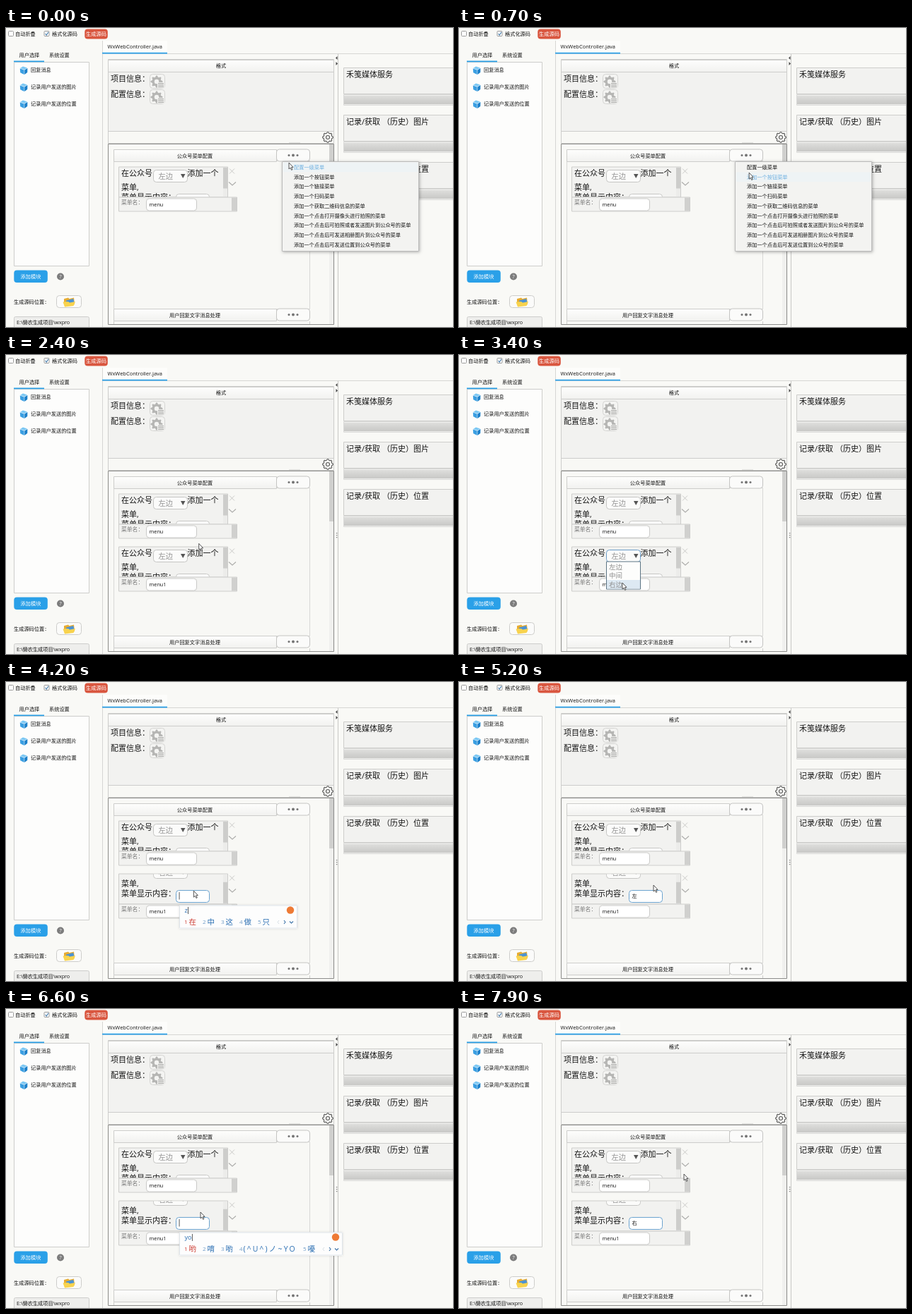
An HTML page with a canvas that plays this animation: 632x424 px, repeating every 8000 ms.

```html
<!DOCTYPE html>
<html lang="zh">
<head>
<meta charset="utf-8">
<style>
html, body { margin: 0; width: 100%; height: 100%; overflow: hidden; background: #f9f9f6; }
canvas { display: block; width: 632px; height: 424px; }
</style>
</head>
<body>
<canvas id="stage"></canvas>
<script>
const W = 632, H = 424, LOOP = 8000, STEP = 100;
const canvas = document.getElementById('stage');
const dpr = window.devicePixelRatio || 1;
canvas.width = W * dpr;
canvas.height = H * dpr;
const c = canvas.getContext('2d');
const FONT = '"Open Sans", "Noto Sans CJK SC", "Noto Sans CJK", sans-serif';
const BLUE = '#2aa0e8', INK = '#151515', LINE = '#cdcdcb', PANEL = '#f2f2f0', PAGE = '#f9f9f6';

// Event times in ms
const ADDED = 1100, DROP_OPEN = 2800, PICKED = 3700, SCROLL = 3800, FOCUS = 4100;

// Pointer keys: time, x, y
const POINTER = [
  [0, 400, 191], [200, 400, 191], [600, 410, 205], [1000, 411, 206], [1400, 413, 200],
  [1900, 413, 200], [2600, 238, 284], [2900, 238, 284], [3300, 231, 323], [3700, 231, 323],
  [3900, 262, 297], [4100, 262, 299], [4400, 275, 288], [7700, 275, 288], [7900, 318, 234]
];

// Input method states: from, to, typed letters, candidates
const IME = [
  [4200, 4300, 'z', '在 中 这 做 只'],
  [4300, 4400, 'zu', '组 足 族 租 祖'],
  [4400, 4700, 'zuo', '做 坐 作 左 座'],
  [6500, 6600, 'y', '一 有 也 要 与'],
  [6600, 6700, 'yo', '哟 唷 喲 (^U^)ノ~YO 嚘'],
  [6700, 7100, 'you', '有 又 右 由 友']
];

// Field edits: time, value; each one restarts the caret blink
const EDITS = [[FOCUS, ''], [4700, '左'], [5400, ''], [7100, '右']];

const MENU = ['配置一级菜单', '添加一个按钮菜单', '添加一个链接菜单', '添加一个扫码菜单',
  '添加一个获取二维码信息的菜单', '添加一个点击打开摄像头进行拍照的菜单',
  '添加一个点击后可拍照或者发送图片到公众号的菜单',
  '添加一个点击后可发送相册图片到公众号的菜单', '添加一个点击后可发送位置到公众号的菜单'];

function text(s, x, y, size = 7.2, color = INK, align = 'left', weight = 400) {
  c.font = `${weight} ${size}px ${FONT}`;
  c.fillStyle = color;
  c.textAlign = align;
  c.textBaseline = 'alphabetic';
  c.fillText(s, x, y + size * 0.37);
}

function rect(x, y, w, h, fill, stroke, r = 0, lw = 1) {
  c.beginPath();
  c.roundRect(stroke ? x + 0.5 : x, stroke ? y + 0.5 : y, stroke ? w - 1 : w, stroke ? h - 1 : h, r);
  if (fill) { c.fillStyle = fill; c.fill(); }
  if (stroke) { c.strokeStyle = stroke; c.lineWidth = lw; c.stroke(); }
}

function path(pts, color, lw = 1, fill) {
  c.beginPath();
  pts.forEach(([x, y], i) => i ? c.lineTo(x, y) : c.moveTo(x, y));
  if (fill) { c.closePath(); c.fillStyle = fill; c.fill(); }
  if (color) { c.strokeStyle = color; c.lineWidth = lw; c.stroke(); }
}

function disc(x, y, r, fill) {
  c.beginPath();
  c.arc(x, y, r, 0, 7);
  c.fillStyle = fill;
  c.fill();
}

function clipped(x, y, w, h, draw) {
  c.save();
  c.beginPath();
  c.rect(x, y, w, h);
  c.clip();
  draw();
  c.restore();
}

function gradient(y, h, from, to) {
  const g = c.createLinearGradient(0, y, 0, y + h);
  g.addColorStop(0, from);
  g.addColorStop(1, to);
  return g;
}

const header = (x, y, w, h) => rect(x, y, w, h, gradient(y, h, '#fefefd', '#f1f1ef'), LINE);

function gearPath(x, y, r, inner, teeth) {
  c.beginPath();
  for (let i = 0; i < teeth * 4; i++) {
    const a = (i - 0.5) * Math.PI / teeth / 2, d = i % 4 < 2 ? r : inner;
    c.lineTo(x + Math.cos(a) * d, y + Math.sin(a) * d);
  }
  c.closePath();
}

function gearButton(y) {
  rect(203, y, 22, 21, '#f4f4f2', '#d4d4d2', 4);
  gearPath(213, y + 11, 8.5, 6.5, 8);
  c.fillStyle = '#b6b6b4';
  c.fill();
  disc(213, y + 11, 3.2, '#f4f4f2');
  rect(214, y + 12, 9.5, 8, '#f4f4f2');
  for (let i = 0; i < 3; i++) rect(215, y + 13 + i * 2.4, 8, 1.2, '#acacaa');
}

function cube(x, y) {
  path([[x - 1, y - 5.5], [x + 5, y - 3.6], [x + 1, y - 1], [x - 5, y - 3]], null, 0, '#7cc8f4');
  path([[x - 5.2, y - 2.4], [x + 0.6, y - 0.4], [x + 0.6, y + 6], [x - 4.8, y + 3.2]], null, 0, '#3a9fe2');
  path([[x + 5.4, y - 3], [x + 1.2, y - 0.4], [x + 1.2, y + 6], [x + 5.2, y + 3]], null, 0, '#1c80ca');
}

function sidebar() {
  rect(3, 4, 8, 8, '#fff', '#9b9b9b', 1);
  text('自动折叠', 13, 8);
  rect(53.5, 4, 8, 8, '#fff', '#9b9b9b', 1);
  path([[55.5, 8], [57.2, 10], [60, 5.8]], '#3f78a8', 1.1);
  text('格式化源码', 65, 8);
  rect(111.3, 1.5, 32.5, 14, '#d9563f', null, 4);
  text('生成源码', 127.5, 8.3, 7.2, '#fff', 'center');

  text('用户选择', 18.5, 38.5);
  text('系统设置', 61, 38.5);
  rect(11, 48, 107, 290, '#fdfdfc', LINE);
  rect(11, 46.5, 43, 1.7, BLUE);
  ['回复消息', '记录用户发送的图片', '记录用户发送的位置'].forEach((s, i) => {
    cube(25, 60 + i * 24);
    text(s, 35, 59 + i * 24);
  });

  rect(11.3, 343.5, 47.5, 17.5, BLUE, null, 4);
  text('添加模块', 35, 352, 7.2, '#fff', 'center');
  disc(77, 352.5, 5, '#7c7c7c');
  text('?', 77, 352.5, 7.5, '#fff', 'center');
  text('生成源码位置：', 11, 388);
  rect(71, 379, 36, 18, '#fbfbfa', LINE, 4);
  path([[82, 393], [82, 384], [88, 382.5], [89.5, 384], [96, 382.5], [97, 392]], null, 0, '#e6ac32');
  path([[85, 386.5], [95, 384], [97, 390], [86, 391]], null, 0, '#4c93d4');
  path([[80.5, 388.5], [88, 388], [90, 389.5], [98, 388], [95.5, 394], [83, 395.5]], null, 0, '#f8d34e');
  rect(11, 409, 107, 20, '#eeeeec', LINE, 2);
  text('E:\\懒农生成项目\\wxpro', 15, 417);
}

function dotsButton(y) {
  rect(382, y, 48, 18, '#fbfbfa', '#c4c4c2', 4);
  [400, 406, 412].forEach((x, i) => disc(x, y + 9, i === 1 ? 2 : 1.5, '#747474'));
}

function workspace() {
  rect(136, 18, 1, 406, '#d6d6d4');
  rect(136, 36, 496, 1, '#d6d6d4');
  rect(137, 18, 91, 18, '#fdfdfb');
  rect(136, 34.7, 92, 1.8, BLUE);
  text('WxWebController.java', 143.5, 26.4, 7.5);

  rect(144, 44, 320, 120, PANEL, LINE);
  header(144, 45, 320, 18);
  text('格式', 304, 53.5, 7.2, INK, 'center');
  text('项目信息：', 148, 71.5, 11);
  text('配置信息：', 148, 94, 11);
  gearButton(65);
  gearButton(87);
  rect(144, 146, 320, 1, LINE);
  rect(145, 147, 318, 16, '#f8f8f5');
  gearPath(455, 155, 7.3, 6, 8);
  c.strokeStyle = '#585858';
  c.lineWidth = 1.1;
  c.lineJoin = 'round';
  c.stroke();
  c.beginPath();
  c.arc(455, 155, 2.5, 0, 7);
  c.stroke();
  c.lineJoin = 'miter';
  rect(400, 162.5, 16, 1, '#c4c4c2');

  rect(144, 164, 320, 257, PAGE, '#8c8c8a');
  rect(457, 165, 6, 255, '#f0f0ee');
  rect(457, 165, 6, 71, '#d0d0ce');
  rect(152, 188, 278, 211, '#f8f8f5', '#d8d8d6');
  header(152, 172, 231, 18);
  text('公众号菜单配置', 267, 181, 7.2, INK, 'center');
  dotsButton(171.5);
  header(152, 398, 231, 18);
  text('用户回复文字消息处理', 267, 407, 7.2, INK, 'center');
  dotsButton(397.5);
  rect(152, 416, 1, 4, LINE);
  rect(429, 416, 1, 4, LINE);
}

function services() {
  rect(469, 37, 1, 387, '#c8c8c6');
  path([[468.5, 40], [468.5, 45], [466, 42.5]], null, 0, '#444');
  path([[466.5, 48], [466.5, 53], [469, 50.5]], null, 0, '#444');
  [252, 255, 258].forEach(y => rect(467, y, 1.3, 1.3, '#777'));
  ['禾笺媒体服务', '记录/获取 （历史）图片', '记录/获取 （历史）位置'].forEach((s, i) => {
    const y = 56 + i * 67;
    rect(477, y, 160, 38, PANEL, LINE);
    text(s, 481, y + 9.7, 11);
    rect(477, y + 38, 160, 16, '#ededeb', '#dadad8');
    rect(478, y + 40, 154, 12, gradient(y + 40, 12, '#dededc', '#c8c8c6'));
  });
}

function combo(y, value, active) {
  rect(208, y, 49, 18, '#fbfbfa', active ? '#6a9cc8' : '#c6c6c4', 4);
  text(value, 215.5, y + 9.5, 10.2, '#939393', 'left', 300);
  path([[247, y + 6], [253.5, y + 6], [250.2, y + 12]], null, 0, '#555');
}

function card(y, name, opt) {
  const { scroll = 0, choice = '左边', open = false, focus = false, value = '', caret = false } = opt;
  rect(159, y, 155, 44, PANEL, LINE);
  clipped(160, y + 1, 153, 42, () => {
    const top = y - scroll;
    text('在公众号', 163, top + 9.5, 11);
    combo(top + 4.5, choice, open);
    text('添加一个', 256.5, top + 9.5, 11);
    text('菜单,', 163, top + 29, 11);
    text('菜单显示内容：', 163, top + 43.2, 11);
    rect(240, top + 38.5, 48, 18, '#fff', focus ? '#6ba3cf' : '#c6c6c4', 4);
    text(value, 244.5, top + 47, 7.2);
    if (caret) rect(value ? 252 : 244.6, top + 41.5, 0.9, 10.5, '#444');
    rect(307, y + 1, 6, 42, '#ececea');
    rect(307, y + 1 + scroll * 0.75, 6, 30, '#cdcdcb');
  });
  rect(159, y + 43, 168, 21, PANEL, LINE);
  text('菜单名：', 163, y + 51, 7.8, '#777');
  rect(198, y + 45, 72, 18, '#fff', '#cacac8', 4);
  text(name, 202.5, y + 54, 7.3);
  rect(319, y + 44, 7, 19, '#d0d0ce');
  path([[316, y + 3], [323, y + 10]], '#cacac8');
  path([[323, y + 3], [316, y + 10]], '#cacac8');
  path([[315, y + 22], [320, y + 26.5], [325, y + 22]], '#acacaa', 1.1);
}

function popupMenu(py) {
  c.save();
  c.shadowColor = 'rgba(0,0,0,.3)';
  c.shadowBlur = 4;
  c.shadowOffsetX = c.shadowOffsetY = 1;
  rect(390, 189, 194, 128, '#f3f3f1');
  c.restore();
  rect(390, 189, 194, 128, null, '#bababa');
  const hover = py < 204 ? 0 : 1;
  MENU.forEach((s, i) => {
    const y = 197.3 + i * 13.72;
    if (i === hover) rect(392, y - 6.5, 190, 13.5, '#eef3f5');
    text(s, 407, y, 7.2, i === hover ? '#6fb0e0' : INK);
  });
}

function dropdown(py) {
  rect(208, 292.5, 49, 40, '#fdfdfc', '#5c7484');
  const hover = py < 306 ? 0 : py < 318 ? 1 : 2;
  ['左边', '中间', '右边'].forEach((s, i) => {
    if (i === hover) rect(209, 294 + i * 12.5, 47, 12.5, '#dde9f3');
    text(s, 212, 300 + i * 12.5, 9.5, '#8c8c8c', 'left', 300);
  });
}

function inputMethod(letters, words) {
  const list = words.split(' ');
  const wide = list.some(w => w.length > 1);
  const w = wide ? 231 : 167, right = 245 + w;
  c.save();
  c.shadowColor = 'rgba(0,0,0,.14)';
  c.shadowBlur = 3;
  rect(245, 316.5, w, 33.5, '#fdfdfd', null, 1);
  c.restore();
  rect(245, 316.5, w, 33, null, '#dfe5ea', 1);
  text(letters, 252.5, 324, 9, '#2b6fb3');
  rect(253 + c.measureText(letters).width, 319, 0.8, 10, '#333');
  disc(right - 10, 323.5, 5.2, '#ee7a35');
  let x = 252;
  list.forEach((word, i) => {
    const phrase = word.length > 1;
    const color = i ? '#2b6fb3' : '#cc3a30';
    text(String(i + 1), x, 340, 8, i ? '#6c9ac6' : color);
    c.letterSpacing = phrase ? '2.2px' : '0px';
    text(word, x + (phrase ? 5.5 : 6.5), 340, 10.5, color);
    c.letterSpacing = '0px';
    x += phrase ? 90 : 26;
  });
  path([[right - 26, 338], [right - 28, 340.5], [right - 26, 343]], '#d5dde4');
  path([[right - 19, 338], [right - 17, 340.5], [right - 19, 343]], '#3c72a8', 1.1);
  path([[right - 11, 339.5], [right - 8.5, 342], [right - 6, 339.5]], '#3c72a8', 1.1);
}

function pointerAt(t) {
  const i = POINTER.findIndex(k => k[0] > t);
  if (i < 0) return POINTER[POINTER.length - 1].slice(1);
  const [t0, x0, y0] = POINTER[i - 1], [t1, x1, y1] = POINTER[i];
  const u = (t - t0) / (t1 - t0), e = u * u * (3 - 2 * u);
  return [x0 + (x1 - x0) * e, y0 + (y1 - y0) * e];
}

function pointer(x, y) {
  const shape = [[0, 0], [0, 9], [2, 7.2], [3.6, 10.4], [5, 9.7], [3.5, 6.6], [6, 6.4]];
  path([...shape, [0, 0]].map(([dx, dy]) => [x + dx, y + dy]), '#444', 0.9, '#fafafa');
}

function draw(t) {
  const [px, py] = pointerAt(t);
  c.setTransform(dpr, 0, 0, dpr, 0, 0);
  rect(0, 0, W, H, PAGE);
  sidebar();
  workspace();
  services();
  card(196.5, 'menu', {});
  if (t >= ADDED) {
    const edit = EDITS.filter(e => e[0] <= t).pop();
    card(271.5, 'menu1', {
      scroll: t < SCROLL ? 0 : t < SCROLL + STEP ? 8 : 15,
      choice: t < PICKED ? '左边' : '右边',
      open: t >= DROP_OPEN && t < PICKED,
      focus: !!edit,
      value: edit ? edit[1] : '',
      caret: !!edit && (t - edit[0]) % 1000 < 500
    });
  } else {
    popupMenu(py);
  }
  if (t >= DROP_OPEN && t < PICKED) dropdown(py);
  const ime = IME.find(s => t >= s[0] && t < s[1]);
  if (ime) inputMethod(ime[2], ime[3]);
  pointer(px, py);
}

const start = performance.now();
function tick() {
  const t = (performance.now() - start) % LOOP;
  draw(Math.floor(t / STEP) * STEP);
  requestAnimationFrame(tick);
}
tick();
</script>
</body>
</html>
```
